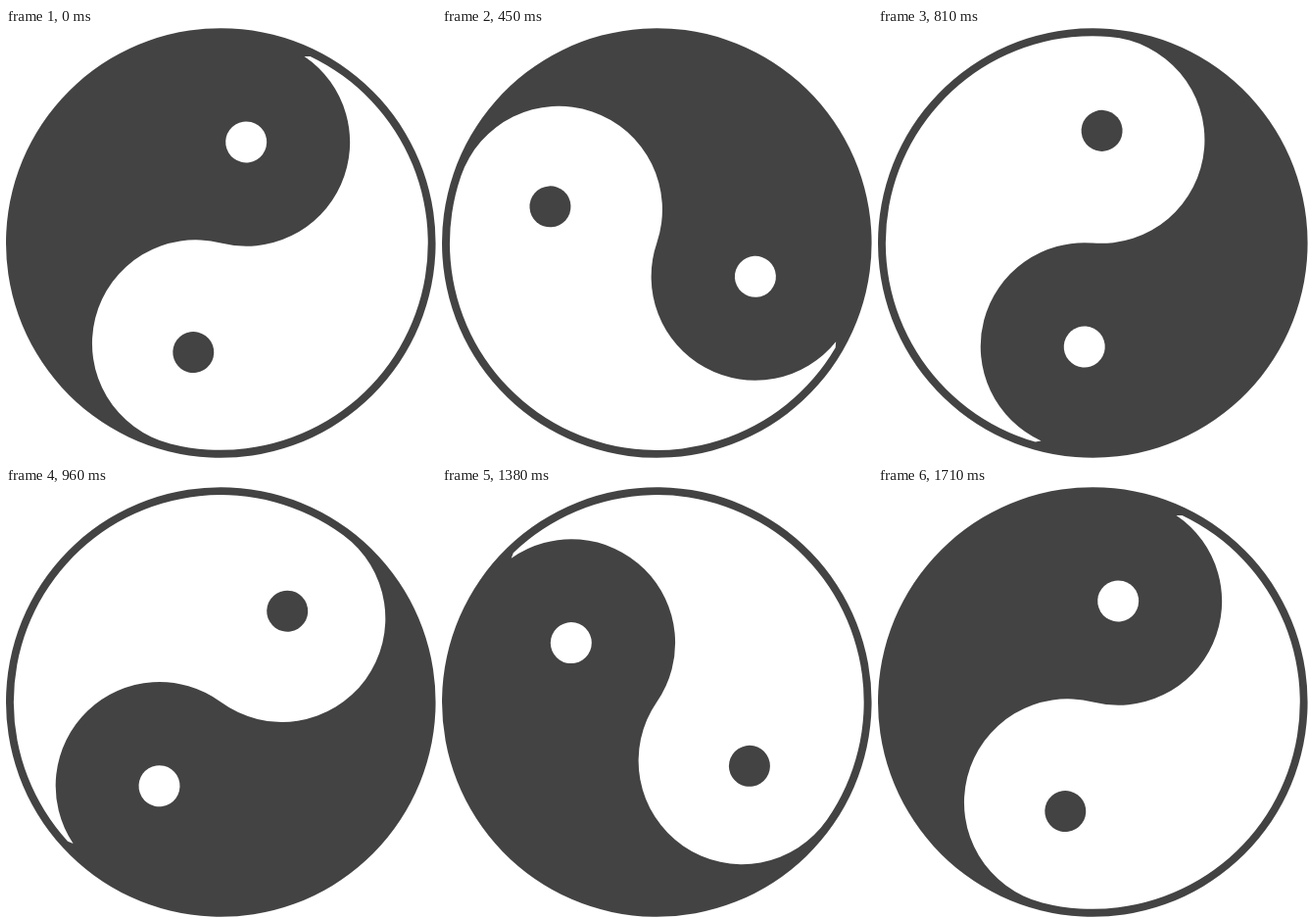
An HTML page for the animation above (1740 ms loop, 439 by 440 pixels).

```html
<!DOCTYPE html>
<html lang="en">
<head>
<meta charset="utf-8">
<title>Turning yin and yang</title>
<style>
  html, body { margin: 0; width: 100%; height: 100%; overflow: hidden; background: #fff; }
  svg { display: block; }
</style>
</head>
<body>
<svg width="439" height="440" fill="#434343">
  <g id="disc">
    <circle r="219.3"/>
    <path fill="#fff" d="M36.3-205.6L42.1-207.1A211.3 211.3 0 0 1 0 211.3A105.65 105.65 0 0 1 0 0A106 106 0 0 0 36.3-205.6Z"/>
    <circle cy="-106.3" r="21" fill="#fff"/>
    <circle cy="115" r="21"/>
  </g>
</svg>
<script>
  const LOOP = 1740, STEP = 30, TURN_STEPS = 57, START = 14.1;
  const disc = document.getElementById('disc');
  const t0 = performance.now();

  function draw(now) {
    // One full turn in 57 steps; the last step equals the first.
    const step = Math.floor(Math.max(0, now - t0) % LOOP / STEP);
    const angle = START + step * 360 / TURN_STEPS;
    disc.setAttribute('transform', `translate(219.3 219.5) rotate(${angle})`);
    requestAnimationFrame(draw);
  }
  draw(t0);
</script>
</body>
</html>
```
